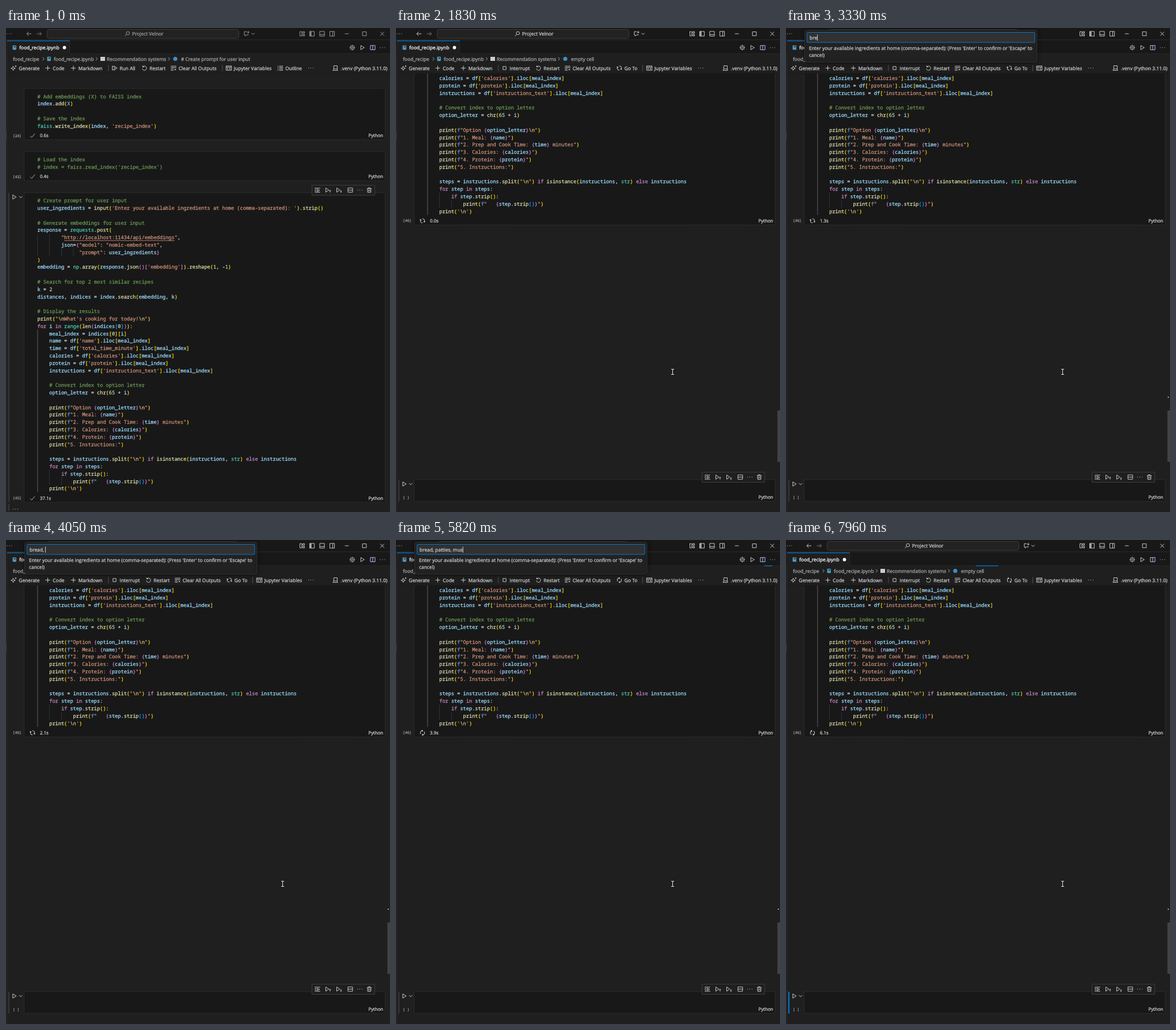
An HTML page with a canvas for the animation above (8000 ms loop, 667 by 839 pixels).

```html
<!DOCTYPE html>
<html lang="en">
<head>
<meta charset="utf-8">
<title>Notebook run</title>
<style>
html, body { margin: 0; width: 100%; height: 100%; overflow: hidden; background: #1f1f1f; }
canvas { display: block; width: 667px; height: 839px; }
</style>
</head>
<body>
<canvas id="stage"></canvas>
<script>
const W = 667, H = 839, LOOP = 8000;
const CLICK = 580, RUN = 1830, PROMPT = 1910, ENTER = 7200;
const CODE_X = 54.5, CHAR = 5.177, LINE = 12.795;
const UI = '"Open Sans", sans-serif', MONO = '"Noto Sans Mono", monospace';
const FG = '#cccccc', ACCENT = '#0078d4', PAGE = '#1f1f1f', DARK = '#181818', EDGE = '#2b2b2b';

const canvas = document.getElementById('stage');
const dpr = window.devicePixelRatio || 1;
canvas.width = W * dpr;
canvas.height = H * dpr;
const ctx = canvas.getContext('2d');
ctx.textRendering = 'geometricPrecision';
ctx.lineJoin = 'round';

// Icons on a 16 x 16 grid
const ICONS = {
  plus: 'M8 2v12M2 8h12',
  play: 'M4 2.5v11l9-5.5z',
  runAll: 'M2.5 2.5v11l8-5.5zM6 2l9 6-9 6',
  restart: 'M3.5 5A5.5 5.5 0 1 1 2.5 9M3.5 1.5V5H7',
  clear: 'M1 3h14M1 6.5h14M1 10h7M1 13.5h7M10.5 9.5l4 4M14.5 9.5l-4 4',
  table: 'M1 2.5h14v11H1zM1 5.5h14M3.5 8h3M3.5 11h3M9 8h3.5M9 11h3.5',
  outline: 'M5 3h10M5 6.5h10M5 10h10M5 13.5h10M1 3h2M1 6.5h2M1 10h2M1 13.5h2',
  stop: 'M4 4h8v8H4z',
  sync: 'M3 7a5 5 0 0 1 9-2.5M12.5 2v3h-3M13 9a5 5 0 0 1-9 2.5M3.5 14v-3h3',
  chevRight: 'M6 4l4 4-4 4',
  chevDown: 'M4 6l4 4 4-4',
  check: 'M2 9l4 4 8-10',
  left: 'M14 8H2M7 3L2 8l5 5',
  right: 'M2 8h12M9 3l5 5-5 5',
  search: 'M14 6.5a4.2 4.2 0 1 1-8.4 0a4.2 4.2 0 1 1 8.4 0M6.7 9.5L2 14',
  gear: 'M8 3a5 5 0 1 0 .01 0M8 6a2 2 0 1 0 .01 0M8 1v2M8 13v2M1 8h2M13 8h2M3 3l1.5 1.5M11.5 11.5L13 13M13 3l-1.5 1.5M3 13l1.5-1.5',
  split: 'M2 2.5h12v11H2zM8 2.5v11',
  splitCell: 'M2 2.5h12v11H2zM2 8h12',
  layout: 'M2 2.5h5v11H2zM9.5 2.5H14v4H9.5zM9.5 9.5H14v4H9.5z',
  panelLeft: 'M2 2h12v12H2zM3 3h3v10H3zM4.5 3v10',
  panelBottom: 'M2 2h12v12H2zM2 10h12',
  panelRight: 'M2 2h12v12H2zM9.5 2v12',
  minimize: 'M3 8h10',
  maximize: 'M3 3h10v10H3z',
  close: 'M3 3l10 10M13 3L3 13',
  trash: 'M2 4h12M6 4V2h4v2M3.5 4l.5 10h8l.5-10M6.5 6.5v5M9.5 6.5v5',
  runLines: 'M1 3h14M1 6.5h4M1 10h4M1 13.5h14M7.5 5.5v6l6-3z',
  runAbove: 'M2 2.5v11L10 8zM13 14V8M11 10l2-2 2 2',
  runBelow: 'M2 2.5v11L10 8zM13 8v6M11 12l2 2 2-2',
  dots: 'M1.5 8H3M7.2 8h1.6M13 8h1.5',
  sparkle: 'M6.5 3l1.5 4 4 1.5L8 10l-1.5 4L5 10 1 8.5 5 7zM13 1v4M11 3h4',
  chat: 'M8 2.5H2V11h2v3l3-3h5V9M12 1v6M9 4h6',
  kernel: 'M4 2h9v8H4zM4 10l-2 4h12l-1-4'
};
for (const name in ICONS) ICONS[name] = new Path2D(ICONS[name]);

function icon(name, x, y, color = FG, angle = 0) {
  ctx.save();
  ctx.translate(x, y);
  ctx.rotate(angle);
  ctx.scale(0.673, 0.673);
  ctx.translate(-8, -8);
  ctx.strokeStyle = color;
  ctx.lineWidth = name === 'dots' ? 1.8 : 1.45;
  ctx.stroke(ICONS[name]);
  ctx.restore();
}

function rect(x, y, w, h, color) {
  ctx.fillStyle = color;
  ctx.fillRect(x, y, w, h);
}

function box(x, y, w, h, fill, stroke, radius = 0) {
  ctx.beginPath();
  ctx.roundRect(x, y, w, h, radius);
  ctx.fillStyle = fill;
  ctx.fill();
  ctx.strokeStyle = stroke;
  ctx.lineWidth = 1;
  ctx.stroke();
}

function dot(x, y, r, color) {
  ctx.beginPath();
  ctx.arc(x, y, r, 0, 7);
  ctx.fillStyle = color;
  ctx.fill();
}

// A hairline outline gives small type its full weight
function inkText(text, x, y, color) {
  ctx.fillStyle = ctx.strokeStyle = color;
  ctx.lineWidth = 0.28;
  ctx.fillText(text, x, y);
  ctx.strokeText(text, x, y);
}

function label(text, x, y, color = FG, size = 8.38, font = UI) {
  ctx.font = `${size}px ${font}`;
  inkText(text, x, y + size * 0.36, color);
  return ctx.measureText(text).width;
}

// Syntax colouring
const BRACKETS = ['#ffd700', '#da70d6', '#179fff'];
const TOKEN = /(#.*)|(f?)("[^"]*"|'[^']*')|([A-Za-z_]\w*)(?=(\()?)|(\d+)|([([{])|([)\]}])|\s+|./g;
const KEYWORDS = ['for', 'in', 'if', 'else'];
const TYPES = ['faiss', 'requests', 'np', 'str', 'range'];
let depth = 0;

function nameColor(name, called) {
  if (KEYWORDS.includes(name)) return '#c586c0';
  if (TYPES.includes(name)) return '#4ec9b0';
  if (name === 'X') return '#4fc1ff';
  return called ? '#dcdcaa' : '#9cdcfe';
}

function tokenize(line) {
  const out = [];
  for (const [all, comment, prefix, string, name, called, number, open, shut] of line.matchAll(TOKEN)) {
    if (comment) out.push([all, '#6a9955']);
    else if (string) {
      if (prefix) out.push(['f', '#569cd6']);
      for (const part of string.split(/(\\n|\{[^}]*\})/)) {
        if (part[0] === '{') out.push(...tokenize(part));
        else out.push([part, part === '\\n' ? '#d7ba7d' : '#ce9178']);
      }
    }
    else if (name) out.push([all, nameColor(name, called)]);
    else if (number) out.push([all, '#b5cea8']);
    else if (open) out.push([all, BRACKETS[depth++ % 3]]);
    else if (shut) out.push([all, BRACKETS[--depth % 3]]);
    else out.push([all, '#d4d4d4']);
  }
  return out;
}

function parse(source) {
  depth = 0;
  const lines = source.split('\n');
  return lines.map((line, i) => ({
    tokens: tokenize(line),
    indent: (line || lines[i + 1] || '').search(/\S|$/)
  }));
}

const ADD = parse(String.raw`# Add embeddings (X) to FAISS index
index.add(X)

# Save the index
faiss.write_index(index, 'recipe_index')`);

const LOAD = parse(String.raw`# Load the index
# index = faiss.read_index('recipe_index')`);

const SEARCH = parse(String.raw`# Create prompt for user input
user_ingredients = input('Enter your available ingredients at home (comma-separated): ').strip()

# Generate embeddings for user input
response = requests.post(
        "http://localhost:11434/api/embeddings",
        json={"model": "nomic-embed-text",
              "prompt": user_ingredients}
)
embedding = np.array(response.json()['embedding']).reshape(1, -1)

# Search for top 2 most similar recipes
k = 2
distances, indices = index.search(embedding, k)

# Display the results
print("\nWhat's cooking for today!\n")
for i in range(len(indices[0])):
    meal_index = indices[0][i]
    name = df['name'].iloc[meal_index]
    time = df['total_time_minute'].iloc[meal_index]
    calories = df['calories'].iloc[meal_index]
    protein = df['protein'].iloc[meal_index]
    instructions = df['instructions_text'].iloc[meal_index]

    # Convert index to option letter
    option_letter = chr(65 + i)

    print(f"Option {option_letter}\n")
    print(f"1. Meal: {name}")
    print(f"2. Prep and Cook Time: {time} minutes")
    print(f"3. Calories: {calories}")
    print(f"4. Protein: {protein}")
    print("5. Instructions:")

    steps = instructions.split("\n") if isinstance(instructions, str) else instructions
    for step in steps:
        if step.strip():
            print(f"   {step.strip()}")
    print('\n')`);

const EMPTY = parse('');

function codeLine({ tokens, indent }, y, bright) {
  for (let col = 0; col < indent; col += 4) {
    rect(CODE_X + col * CHAR, y - LINE / 2, 0.8, LINE + 0.1, bright && !col ? '#707070' : '#3c3c3c');
  }
  ctx.font = `8.628px ${MONO}`;
  let col = 0;
  for (const [text, color] of tokens) {
    for (const ch of text) inkText(ch, CODE_X + CHAR * col++, y + 3, color);
    if (text.startsWith('"http')) rect(CODE_X + (col - text.length + 1) * CHAR, y + 5, (text.length - 2) * CHAR, 0.8, color);
  }
}

function cell(top, lines, count, { border = EDGE, time = '', mark, cursorRow = -1, caret } = {}) {
  const first = top + 13.8, last = first + (lines.length - 1) * LINE, status = last + 16.7;
  box(31.5, top, 627, status + 7.2 - top, DARK, border);
  if (cursorRow >= 0) {
    const y = first + cursorRow * LINE - LINE / 2;
    ctx.strokeStyle = '#303030';
    ctx.strokeRect(52.5, Math.round(y) + 0.5, 605.5, 12);
    ctx.strokeStyle = '#888888';
    for (const col of [47, 58]) ctx.strokeRect(CODE_X + col * CHAR, y + 1, CHAR, 11);
  }
  lines.forEach((line, i) => codeLine(line, first + i * LINE, i > 17));
  if (caret) rect(359.5, first + cursorRow * LINE - 6.4, 1.3, LINE, '#e8e8e8');
  label(count, 12, status, '#9a9a9a', 6.17, MONO);
  if (mark) mark(46, status);
  label(time, 59, status, FG, 7.8);
  label('Python', 629.5, status, FG, 7.8);
}

function cellControls(top, barColor, bottom) {
  rect(4, top, 2, bottom - top, barColor);
  icon('play', 14.5, top + 7.5);
  icon('chevDown', 25.5, top + 7.5);
  box(531.5, top - 13, 109, 17.5, PAGE, '#3c3c3c');
  ['runLines', 'runAbove', 'runBelow', 'splitCell', 'dots', 'trash'].forEach((name, i) =>
    icon(name, [541, 559.5, 578.5, 598, 614.5, 631][i], top - 4.5));
}

function notebook(t, spin) {
  const check = (x, y) => icon('check', x, y, '#89d185');
  if (t < RUN) {
    const focused = t >= CLICK, color = focused ? ACCENT : '#37373d';
    cell(104.8, ADD, '[24]', { time: '0.6s', mark: check });
    cell(214.2, LOAD, '[42]', { time: '0.4s', mark: check });
    cell(285.5, SEARCH, '[45]', {
      time: '37.1s', mark: check,
      border: focused ? ACCENT : EDGE,
      cursorRow: focused ? 23 : -1,
      caret: focused && Math.floor((t - CLICK - 10) / 490) % 2 !== 1
    });
    cellControls(285.5, color, 822);
    rect(4, 825, 2, 12, color);
    icon('dots', 16.5, 834);
  } else {
    const ticks = Math.floor((t - 1960) / 200);
    const elapsed = ticks < 0 ? 0 : 0.1 + 0.2 * ticks;
    cell(-195.3, SEARCH, '[46]', {
      time: elapsed.toFixed(1) + 's',
      mark: (x, y) => icon('sync', x, y, FG, spin)
    });
    cell(783, EMPTY, '[ ]');
    cellControls(783, t < ENTER ? '#37373d' : ACCENT, 821);
  }
}

function titleBar(t) {
  const color = t < CLICK ? '#9d9d9d' : FG;
  rect(0, 0, W, 44.5, DARK);
  rect(0, 20, W, 1, EDGE);
  box(71.5, 2.5, 333, 15.5, '#222222', '#3c3c3c', 4);
  icon('dots', 6, 10, color);
  icon('left', 40, 10, color);
  icon('right', 57.5, 10, '#7a7a7a');
  icon('search', 210.5, 10, color);
  label('Project Velnor', 219, 10, color);
  icon('chat', 418, 10, color);
  icon('chevDown', 429, 10, color);
  ['layout', 'panelLeft', 'panelBottom', 'panelRight', 'minimize', 'maximize', 'close'].forEach((name, i) =>
    icon(name, [514.5, 531.5, 549, 566.5, 592, 622.5, 653.5][i], 10, color));
}

function notebookIcon(x, y) {
  ctx.beginPath();
  ctx.roundRect(x - 3, y - 3.8, 6.4, 7.6, 1);
  ctx.fillStyle = '#519aba';
  ctx.fill();
  rect(x - 0.6, y - 2.2, 2.8, 1.6, DARK);
}

function tabs(t) {
  rect(2, 21, 108, 24, PAGE);
  rect(110, 21, 1, 23, EDGE);
  rect(111, 44, W, 0.7, EDGE);
  rect(2, 21.7, 108.5, 1.2, ACCENT);
  notebookIcon(14.5, 34);
  label('food_recipe.ipynb', 23, 34, '#ffffff');
  dot(101.5, 34, 2.9, '#ffffff');
  icon('gear', 601.5, 34);
  icon('play', 619, 34);
  icon('split', 637, 34, '#b9c3ff');
  icon('dots', 654, 34);

  const grey = '#a9a9a9';
  label('food_recipe', 12, 53.5, grey);
  notebookIcon(74.5, 53.5);
  label('food_recipe.ipynb', 83, 53.5, grey);
  rect(164, 50, 8, 7, FG);
  label('Recommendation systems', 175, 53.5, grey);
  dot(294, 53.5, 3.6, '#3f8fc4');
  label(t < RUN ? '# Create prompt for user input' : 'empty cell', 304, 53.5, grey);
  for (const x of [65, 157.5, 283]) icon('chevRight', x, 53.5, grey);
}

function toolbar(t, spin) {
  const idle = [['runAll', 188.5, 'Run All'], ['restart', 240.5, 'Restart'], ['clear', 291, 'Clear All Outputs'],
    ['table', 387, 'Jupyter Variables'], ['outline', 476.5, 'Outline']];
  const busy = [['stop', 188.5, 'Interrupt'], ['restart', 247.5, 'Restart'], ['clear', 298, 'Clear All Outputs'],
    ['sync', 388, 'Go To'], ['table', 440, 'Jupyter Variables']];
  const running = t >= RUN;
  const items = [['sparkle', 13.5, 'Generate'], ['plus', 72.5, 'Code'], ['plus', 117, 'Markdown'], ...(running ? busy : idle)];
  for (const [name, x, text] of items) {
    icon(name, x, 69.5, FG, name === 'sync' ? spin : 0);
    label(text, x + 8.8, 69.5);
  }
  for (const x of [177.5, running ? 428 : 375.5]) rect(x, 64, 0.8, 11, '#5a5a5a');
  icon('dots', 529.5, 69.5);
  icon('kernel', 572, 69.5);
  label('.venv (Python 3.11.0)', 581.5, 69.5);
}

function progress(t) {
  const start = 1905, bit = W * 0.02;
  if (t < start) return;
  const phase = ((t - start) % 4000) / 2000;
  const shift = phase < 1 ? 25 * phase : 25 + 24 * (phase - 1);
  const width = bit * (3 - 2 * Math.abs(phase - 1));
  rect(bit * (shift + 0.5) - width / 2, 44, width, 1.3, ACCENT);
}

function typed(t) {
  const text = 'bread, patties, mushrooms';
  const count = t < 4800 ? 3 + (t - 3320) / 164.5 : 12 + (t - 4800) / 144;
  return text.slice(0, Math.max(0, Math.floor(count)));
}

function prompt(t) {
  if (t < PROMPT || t >= ENTER) return;
  ctx.save();
  ctx.shadowColor = 'rgba(0,0,0,.55)';
  ctx.shadowBlur = 6;
  box(32.5, 3.5, 403.5, 55.5, '#222222', '#333333', 4);
  ctx.restore();
  box(36.5, 7.5, 395.5, 17.5, '#313131', ACCENT, 1);
  const text = typed(t);
  const width = label(text, 41, 16.7);
  const resting = !text || t > 6800;
  if (!resting || Math.floor((t - (text ? 6700 : PROMPT)) / 500) % 2 === 0) {
    rect(41 + width, 11.5, 0.9, 10.5, '#e0e0e0');
  }
  label("Enter your available ingredients at home (comma-separated): (Press 'Enter' to confirm or 'Escape' to", 40, 34.5);
  label('cancel)', 40, 46.5);
}

function pointer(t) {
  if (t < 40) return;
  const left = (1 - Math.min(1, (t - 40) / 470)) ** 3;
  const x = 480.5 + 90 * left, y = 596 + 240 * left;
  ctx.strokeStyle = '#e6e6e6';
  ctx.lineWidth = 1;
  ctx.beginPath();
  ctx.moveTo(x - 2.5, y - 4.5);
  ctx.lineTo(x + 2.5, y - 4.5);
  ctx.moveTo(x, y - 4.5);
  ctx.lineTo(x, y + 4.5);
  ctx.moveTo(x - 2.5, y + 4.5);
  ctx.lineTo(x + 2.5, y + 4.5);
  ctx.stroke();
}

function scrollbar(t) {
  ctx.globalAlpha = Math.min(1, Math.max(0, (t - 40) / 120));
  rect(662.5, t < RUN ? 606 : 663, 4.5, 89, '#434343');
  ctx.globalAlpha = 1;
  if (t > 2450) rect(663, 639, 2, 2, '#a0a0a0');
}

function draw(now) {
  const t = now % LOOP;
  const spin = Math.floor(t / 50) / 30 * Math.PI * 2;
  ctx.setTransform(dpr, 0, 0, dpr, 0, 0);
  rect(0, 0, W, H, PAGE);
  ctx.save();
  ctx.beginPath();
  ctx.rect(0, 78.5, W, H);
  ctx.clip();
  notebook(t, spin);
  scrollbar(t);
  ctx.restore();
  rect(2, 78, W, 1, '#191919');
  titleBar(t);
  tabs(t);
  toolbar(t, spin);
  progress(t);
  rect(1, 21, 0.8, H, EDGE);
  rect(0, 180, 1, 13, '#3c3c3c');
  prompt(t);
  pointer(t);
  requestAnimationFrame(draw);
}
requestAnimationFrame(draw);
</script>
</body>
</html>
```
